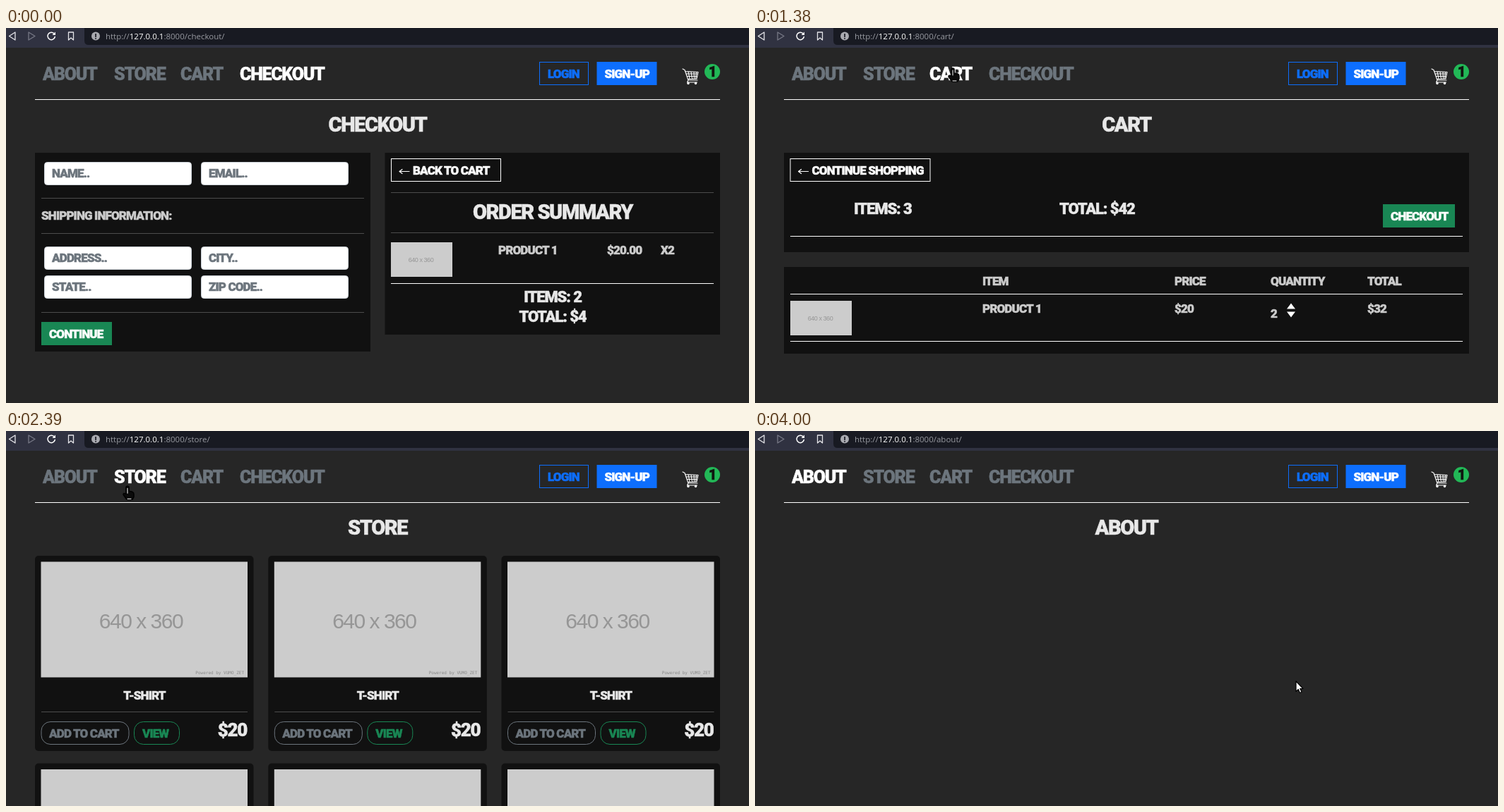
An HTML page for the animation above (4.03 s loop, 1052 by 532 pixels).

```html
<!DOCTYPE html>
<html lang="en">
<head>
<meta charset="utf-8">
<title>Shop walkthrough</title>
<style>
  html, body { margin: 0; width: 100%; height: 100%; overflow: hidden; background: #262626; }
  svg { display: block; width: 100%; height: 100%; }
  text { white-space: pre; }
  .display { font-family: Roboto, sans-serif; font-weight: 900; letter-spacing: -.05em; stroke-width: .5; }
  .placeholder { font-family: "Liberation Sans", Arial, sans-serif; letter-spacing: -.05em; fill: #969696; }
  .credit { font: 6px "DejaVu Sans Mono", monospace; fill: #888; }
  .url { font: 11.5px "Open Sans", sans-serif; fill: #989aa1; }
  .url .host { fill: #fff; }
</style>
</head>
<body>
<svg id="stage" viewBox="0 0 1052 532"></svg>
<script>
const LOOP = 4030;
const WHITE = '#fff', PALE = '#e8e8e8', SOFT = '#ccc', GRAY = '#6c757d', FAINT = '#4c4c4c';
const GREEN = '#198754', BLUE = '#0d6efd', PANEL = '#111';

const NAV = [
  { page: 'about', x: 52, end: 130 },
  { page: 'store', x: 153, end: 224 },
  { page: 'cart', x: 247, end: 308 },
  { page: 'checkout', x: 331, end: 451 }
];

// Each visit: when the link is clicked, when the page appears.
const VISITS = [
  { page: 'checkout', click: -1, shown: 0 },
  { page: 'cart', click: 1120, shown: 1220 },
  { page: 'store', click: 2170, shown: 2300 },
  { page: 'about', click: 3050, shown: 3170 }
];

const POINTER = [
  [70, 700, 511], [640, 575, 265], [1060, 283, 62], [1380, 280, 57], [1680, 276, 60],
  [2140, 178, 72], [2220, 176, 75], [2500, 170, 80], [2900, 82, 94],
  [3040, 78, 72], [3230, 74, 76], [3510, 69, 143], [4000, 766, 355]
];

// Drawing helpers
const rect = (x, y, w, h, fill, r = 0) =>
  `<rect x="${x}" y="${y}" width="${w}" height="${h}" rx="${r}" fill="${fill}"/>`;
const frame = (x, y, w, h, color, r = 0, fill = 'none') =>
  `<rect x="${x + .5}" y="${y + .5}" width="${w - 1}" height="${h - 1}" rx="${r}" fill="${fill}" stroke="${color}"/>`;
const rule = (x, y, w, color) => rect(x, y, w, 1, color);
const line = (d, color, width = 1.5, fill = 'none') =>
  `<path d="${d}" fill="${fill}" stroke="${color}" stroke-width="${width}" stroke-linejoin="round" stroke-linecap="round"/>`;
const label = (text, x, y, color = SOFT, size = 17, anchor = 'start', extra = '') =>
  `<text class="display" x="${x}" y="${y}" font-size="${size}" fill="${color}" stroke="${color}" text-anchor="${anchor}" ${extra}>${text}</text>`;
const title = (text, x, y) => label(text, x, y, PALE, 29, 'middle');
const input = (text, x, y) => frame(x, y, 209, 33, '#ced4da', 4, WHITE) + label(text, x + 11, y + 22, GRAY);
const solidButton = (text, x, y, w, color) => rect(x, y, w, 33, color) + label(text, x + 11, y + 23, WHITE);
const backButton = (text, x, w) => frame(x, 185, w, 33, WHITE) +
  line(`M${x + 26} 203.5h-14m4-3l-4 3l4 3`, WHITE, 1.2) + label(text, x + 31, 208, WHITE);
const picture = (x, y, w, h, size, cx, baseline) => rect(x, y, w, h, '#ccc') +
  `<text class="placeholder" x="${cx}" y="${baseline}" font-size="${size}" text-anchor="middle">640 x 360</text>`;
const thumbnail = (x, y) => picture(x, y, 87, 49, 9, x + 42.5, y + 28);

function toolbar() {
  return rect(0, 0, 1052, 28, '#303241') +
    '<path d="M111 0H1052V24H117Q111 24 111 18Z" fill="#181a22"/>' +
    line('M13 6V17L4.500 11.500Z', '#e4e4e8', 1.3) +
    line('M32 6V17L41 11.500Z', '#777986', 1.3) +
    `<g id="reload">${line('M68.500 8.500A5.200 5.200 0 1 0 69.300 12.500', WHITE)}<path d="M70 5.500V10H65.500Z" fill="#fff"/></g>` +
    `<g id="stop">${line('M59.500 6.500l10 10m0-10l-10 10', WHITE)}</g>` +
    line('M88.500 6H95.500V17L92 14L88.500 17Z', '#e4e4e8', 1.3) +
    '<circle cx="127" cy="11.500" r="6" fill="#a9aab0"/>' +
    rect(126.2, 8, 1.7, 5, '#181a22') + rect(126.2, 14, 1.7, 1.7, '#181a22') +
    '<text class="url" x="141" y="16">http://<tspan class="host">127.0.0.1</tspan>:8000/<tspan id="path"></tspan>/</text>';
}

function header() {
  const basket = line('M958 58l3 1.500l5 14.500h13M961.500 61.500l18.500 1l-2 9.500l-12.500 .5M963 65h16M964 68.500h14.500M966 62l2 10M970 62l1.500 10M974 62.500l.5 9.500M977.500 62.500l-1 9.500M966 74l-1.500 3h14', WHITE, 1.1) +
    '<circle cx="966" cy="78.500" r="1.700" fill="#fff"/><circle cx="976.500" cy="78.500" r="1.700" fill="#fff"/>';
  return NAV.map(n => label(n.page.toUpperCase(), n.x, 73.5, GRAY, 25, 'start', `id="nav-${n.page}"`)).join('') +
    frame(755, 48, 70, 33, BLUE) + label('LOGIN', 767, 71, BLUE) +
    solidButton('SIGN-UP', 836.5, 48, 85, BLUE) + basket +
    '<circle cx="1000" cy="62" r="11" fill="#22b857"/>' + label('1', 1000, 69, '#101510', 20, 'middle') +
    rule(41, 101, 970, WHITE);
}

function checkoutPage() {
  return title('CHECKOUT', 526, 147) + rect(41, 177, 475, 282, PANEL) +
    input('NAME..', 54, 190) + input('EMAIL..', 276, 190) +
    label('SHIPPING INFORMATION:', 50, 272) +
    input('ADDRESS..', 54, 310) + input('CITY..', 276, 310) +
    input('STATE..', 54, 351) + input('ZIP CODE..', 276, 351) +
    [241, 291, 403].map(y => rule(50, y, 457, FAINT)).join('') +
    solidButton('CONTINUE', 50, 417, 100, GREEN) +
    rect(536.5, 177, 474.5, 258, PANEL) + backButton('BACK TO CART', 545, 156) +
    rule(545, 233, 457, FAINT) + title('ORDER SUMMARY', 774, 271) + rule(545, 290, 457, FAINT) +
    thumbnail(545, 304) + label('PRODUCT 1', 697, 321) + label('$20.00', 851, 321) + label('X2', 927, 321) +
    rule(545, 362, 457, WHITE) +
    label('ITEMS: 2', 774, 389, PALE, 22, 'middle') + label('TOTAL: $4', 774, 417, PALE, 22, 'middle');
}

function cartPage() {
  const columns = [['ITEM', 322, 'PRODUCT 1'], ['PRICE', 594, '$20'], ['QUANTITY', 730, ''], ['TOTAL', 867, '$32']];
  return title('CART', 526, 147) + rect(41, 177, 970, 141, PANEL) +
    backButton('CONTINUE SHOPPING', 49.5, 199) +
    label('ITEMS: 3', 140, 264, PALE, 22) + label('TOTAL: $42', 431, 264, PALE, 22) +
    solidButton('CHECKOUT', 889, 250, 102, GREEN) + rule(50, 295, 952, WHITE) +
    rect(41, 339, 970, 123, PANEL) +
    columns.map(([name, x, value]) => label(name, x, 365) + label(value, x, 404)).join('') +
    rule(50, 377, 952, WHITE) + thumbnail(50, 387) + label('2', 730, 411) +
    '<path d="M753 398.500l6-8l6 8zM753 402.500l6 8l6-8z" fill="#fff"/>' + rule(50, 444, 952, WHITE);
}

function storeCard(x, y) {
  return `<g transform="translate(${x} ${y})">` + rect(0, 0, 309.5, 277, PANEL, 5) +
    picture(8.5, 8.5, 292.5, 164, 30, 150, 103) +
    '<text class="credit" x="296" y="168" text-anchor="end">Powered by VUMO_ZET</text>' +
    label('T-SHIRT', 155, 204, PALE, 17, 'middle') + rule(9, 221, 292, FAINT) +
    frame(8.5, 235, 125, 33, GRAY, 13) + label('ADD TO CART', 20, 258, GRAY) +
    frame(140, 235, 65, 33, GREEN, 13) + label('VIEW', 152, 258, GREEN) +
    label('$20', 300, 256, PALE, 26, 'end') + '</g>';
}

function storePage() {
  const columns = [41, 371.3, 701.5];
  return title('STORE', 526, 147) + [177, 471.5].flatMap(y => columns.map(x => storeCard(x, y))).join('');
}

const PAGES = { about: title('ABOUT', 526, 147), store: storePage(), cart: cartPage(), checkout: checkoutPage() };
const HAND = 'M-2 1Q0-1 2 1V7L7 8Q9 9 9 11V15L7 19H-1L-6 12Q-6 9-2 11Z';

const stage = document.getElementById('stage');
stage.innerHTML = rect(0, 0, 1052, 532, '#262626') + toolbar() + header() +
  Object.entries(PAGES).map(([name, art]) => `<g id="page-${name}">${art}</g>`).join('') +
  `<g id="pointer"><g id="arrow">${line('M0 0V14.500L3.300 11.500L5.500 16.500L8 15.300L5.800 10.500H10Z', '#000', 1.2, WHITE)}</g>` +
  `<g id="hand">${line(HAND, '#000', 1.5, '#0b0b0b')}${line('M0 3V10M0 18H5', WHITE, 1)}</g></g>`;

const get = id => document.getElementById(id);
const show = (id, on) => get(id).style.display = on ? '' : 'none';

function pointerAt(t) {
  const next = POINTER.findIndex(key => key[0] > t);
  if (next < 0) return POINTER[POINTER.length - 1].slice(1);
  if (next === 0) return POINTER[0].slice(1);
  const [t0, x0, y0] = POINTER[next - 1], [t1, x1, y1] = POINTER[next];
  const u = (t - t0) / (t1 - t0), eased = u * u * (3 - 2 * u);
  return [x0 + (x1 - x0) * eased, y0 + (y1 - y0) * eased];
}

function draw(t) {
  const { page } = VISITS.filter(v => v.shown <= t).pop();
  const loading = VISITS.some(v => t >= v.click && t < v.shown);
  const [x, y] = pointerAt(t);
  const hovered = NAV.find(n => y > 46 && y < 84 && x > n.x - 8 && x < n.end + 8);

  for (const n of NAV) {
    const color = n.page === page ? WHITE : n === hovered ? '#949494' : GRAY;
    get('nav-' + n.page).setAttribute('fill', color);
    get('nav-' + n.page).setAttribute('stroke', color);
    show('page-' + n.page, n.page === page);
  }
  get('path').textContent = page;
  show('reload', !loading);
  show('stop', loading);
  show('pointer', t >= POINTER[0][0]);
  show('hand', hovered && !loading);
  show('arrow', !hovered || loading);
  get('pointer').setAttribute('transform', `translate(${x.toFixed(1)} ${y.toFixed(1)})`);
}

const start = performance.now();
function tick() {
  draw((performance.now() - start) % LOOP);
  requestAnimationFrame(tick);
}
tick();
</script>
</body>
</html>
```
